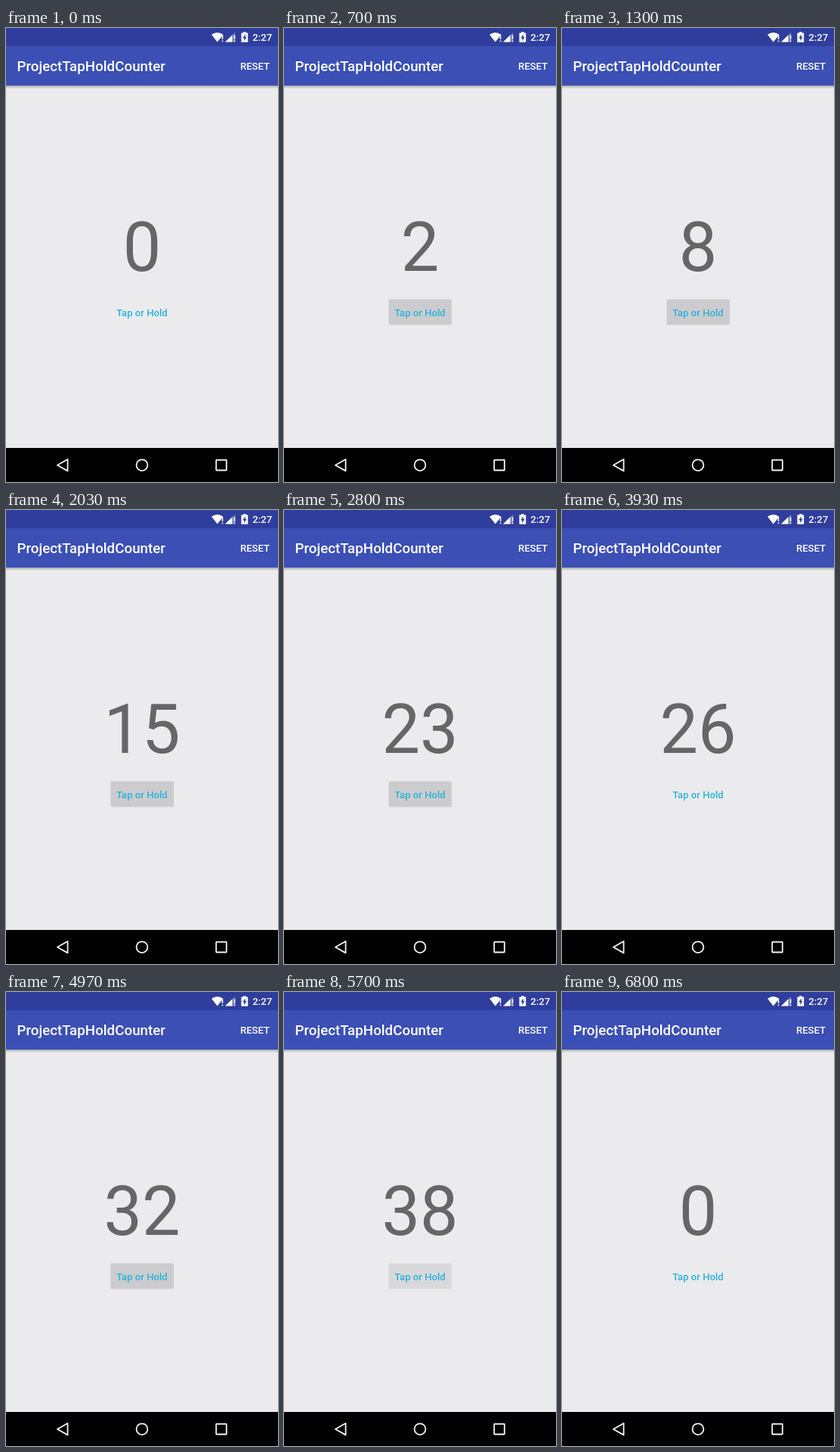
These frames come from a looping animation (360 px wide and 600 px high, 7.3 s). An HTML page:

```html
<!DOCTYPE html>
<html lang="en">
<head>
<meta charset="utf-8">
<title>Tap and hold counter</title>
<style>
  html, body { margin: 0; width: 100%; height: 100%; overflow: hidden; background: #ebebed; }
  svg { display: block; width: 360px; height: 600px; font-family: Roboto, sans-serif; font-weight: 500; }
  .mid { text-anchor: middle; }
  #count { font-size: 90px; font-weight: 400; fill: #666; }
  .btn { font-size: 13.125px; }
  .nav { fill: none; stroke: #f4f4f4; stroke-width: 1.8; stroke-linejoin: round; }

  #press { animation: press 7.3s linear infinite; }
  #wave { transform-origin: 180px 376px; animation: wave 7.3s linear infinite; }
  #reset { transform-origin: 329.5px 50px; animation: reset 7.3s linear infinite; }

  @keyframes press {
    0%, 1.37% { opacity: 0; }
    4.1%, 42.88% { opacity: 1; animation-timing-function: ease-out; }
    48.36%, 54.11% { opacity: 0; animation-timing-function: linear; }
    56.85%, 76.44% { opacity: 1; animation-timing-function: ease-out; }
    82.6%, 100% { opacity: 0; }
  }
  @keyframes wave {
    0%, 1.37% { transform: scale(.1); animation-timing-function: ease-out; }
    6.85%, 48.36% { transform: scale(1); }
    48.37%, 54.11% { transform: scale(.1); animation-timing-function: ease-out; }
    59.59%, 100% { transform: scale(1); }
  }
  @keyframes reset {
    0%, 86.71% { opacity: 0; transform: scale(.2); animation-timing-function: ease-out; }
    88.6% { opacity: .2; transform: scale(.8); animation-timing-function: ease-out; }
    93.1%, 100% { opacity: 0; transform: scale(1); }
  }
</style>
</head>
<body>
<svg viewBox="0 0 360 600">
  <defs>
    <linearGradient id="shade" x2="0" y2="1">
      <stop stop-opacity=".3"/>
      <stop offset="1" stop-opacity="0"/>
    </linearGradient>
    <clipPath id="button"><rect x="138.5" y="358.5" width="83.5" height="34" rx="2"/></clipPath>
    <clipPath id="bar"><rect y="24" width="360" height="52"/></clipPath>
  </defs>

  <rect width="360" height="600" fill="#ebebed"/>
  <rect y="76" width="360" height="4" fill="url(#shade)"/>
  <rect width="360" height="24" fill="#2f3d9c"/>
  <rect y="24" width="360" height="52" fill="#3b4fb5"/>

  <!-- status icons -->
  <g fill="#fff">
    <path d="M272 8.7Q279.7 3.2 287.4 8.7L285 11.8V12L279.7 18.4Z"/>
    <path d="M285.7 9.5h1.6v5.4h-1.6zM285.7 16.4h1.6v1.8h-1.6z"/>
    <path d="M290 18.4H303.3V5.6Z" opacity=".3"/>
    <path d="M290 18.4H299.5V9.3Z"/>
    <path d="M301.7 9.5h1.6v5.4h-1.6zM301.7 16.4h1.6v1.8h-1.6z"/>
    <path d="M314 5.2h3.6v1.4h2.6v12.2h-8.8V6.6h2.6z"/>
  </g>
  <path d="M316.7 8.3l-3.4 5.1h2v3.8l3.2-5.2h-1.8z" fill="#2f3d9c"/>
  <text x="326.3" y="17" font-size="13.125" fill="#fff">2:27</text>

  <!-- app bar -->
  <g clip-path="url(#bar)"><circle id="reset" cx="329.5" cy="50" r="36" fill="#fff"/></g>
  <text x="14.5" y="56.8" font-size="18.75" fill="#fff">ProjectTapHoldCounter</text>
  <text class="btn mid" x="329.5" y="55" fill="#fff">RESET</text>

  <!-- counter and button -->
  <text id="count" class="mid" x="180" y="321">0</text>
  <g id="press" clip-path="url(#button)">
    <rect x="138" y="358" width="85" height="35" opacity=".065"/>
    <circle id="wave" cx="180" cy="376" r="46" opacity=".07"/>
  </g>
  <text class="btn mid" x="180" y="381" fill="#2bb3dc">Tap or Hold</text>

  <!-- navigation bar -->
  <rect y="555" width="360" height="45"/>
  <g class="nav">
    <path d="M68 577.7L81.6 570V585.4Z"/>
    <circle cx="180" cy="577.7" r="7.4"/>
    <rect x="278.2" y="570.9" width="13.6" height="13.6" rx=".5"/>
  </g>
</svg>
<script>
  const LOOP = 7300, STEP = 100, RESET_AT = 6450;
  const label = document.getElementById('count');
  const start = performance.now();

  // Counts reached by a hold whose first tick falls at `first`.
  const ticks = (t, first, max) =>
    Math.max(0, Math.min(max, Math.floor((t - first) / STEP) + 1));

  function draw() {
    const t = (performance.now() - start) % LOOP;
    const n = t < RESET_AT ? ticks(t, 580, 26) + ticks(t, 4440, 12) : 0;
    if (label.textContent !== String(n)) label.textContent = n;
    requestAnimationFrame(draw);
  }
  draw();
</script>
</body>
</html>
```
